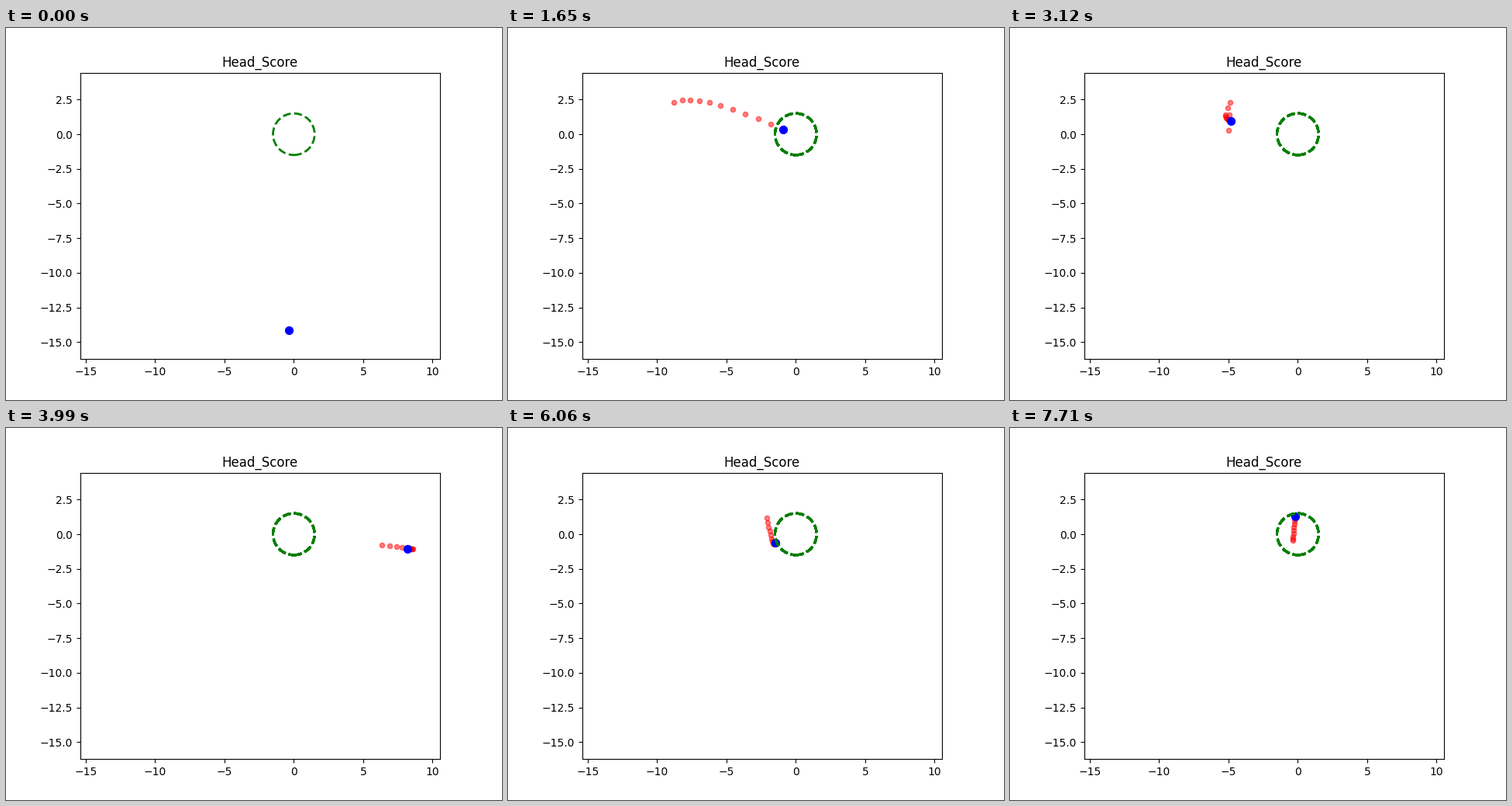
A matplotlib script that plays this animation: 640x480 px, repeating every 7.74 s.

```python
import numpy as np
import matplotlib.pyplot as plt
from matplotlib.animation import FuncAnimation
from matplotlib.patches import Circle

FRAMES, STEP_MS, TRAIL, LAYERS = 258, 30, 10, 40

# Turning points of the head: step, x, y
TURNS = np.array([
    (0, -0.36, -14.15), (16, -0.3, -14.2), (24, -1.34, -11.8),
    (28, -6.62, -6.09), (32, -12.2, -3.02), (35, -13.27, -1.23),
    (47, -7.6, 2.48), (62, 3.0, -1.4), (69, 3.2, -0.67), (71, 2.1, 0),
    (76, -0.92, -0.39), (86, -5.9, -1.06), (94, -5, 0.28), (96, -4.89, 2.32),
    (98, -5.22, 1.4), (104, -4.83, 0.95), (130, 8.6, -1.06),
    (146, 1.24, -1.12), (154, -4.89, -0.34), (163, -5.67, -0.61),
    (187, -2.43, 2.08), (200, -1.59, -0.7), (217, -0.36, 1.31),
    (234, 0.95, -1.09), (247, -0.36, -0.45), (257, -0.19, 1.29),
])


def glide(t, keys, values):
    """Monotone cubic through the keys: eases at every turn, no overshoot."""
    h = np.diff(keys)
    rate = np.diff(values) / h
    a, b = rate[:-1], rate[1:]
    same = a * b > 0
    slope = np.zeros_like(values)
    slope[1:-1] = np.where(same, 2 * a * b / np.where(same, a + b, 1), 0)
    i = np.clip(np.searchsorted(keys, t, side="right") - 1, 0, len(h) - 1)
    u = (t - keys[i]) / h[i]
    return (values[i] + (values[i + 1] - values[i]) * u * u * (3 - 2 * u)
            + h[i] * u * (1 - u) * (slope[i] * (1 - u) - slope[i + 1] * u))


keys, key_x, key_y = TURNS.T
steps = np.arange(FRAMES)
path = np.column_stack([glide(steps, keys, key_x), glide(steps, keys, key_y)])

fig, ax = plt.subplots(figsize=(6.4, 4.8), dpi=100)
fig.subplots_adjust(left=0.1247, right=0.8997)
ax.set_aspect("equal")
ax.set_xlim(-15.4, 10.53)
ax.set_ylim(-16.22, 4.44)
ax.set_title("Head_Score")

trail = ax.scatter([], [], s=20, c="r", alpha=0.5)
head = ax.scatter([], [], s=50, c="b")

# The ring is stacked once per step, so its soft edges harden
rings = [ax.add_patch(Circle((0, 0), 1.5, fill=False, color="green",
                             ls="--", lw=2, zorder=3))
         for _ in range(LAYERS)]


def draw(n):
    trail.set_offsets(path[max(0, n - TRAIL):n])
    head.set_offsets(path[n:n + 1])
    for k, ring in enumerate(rings):
        ring.set_visible(k <= n)
    return [trail, head, *rings]


anim = FuncAnimation(fig, draw, frames=FRAMES, interval=STEP_MS,
                     repeat=True, repeat_delay=0)
plt.show()
```
